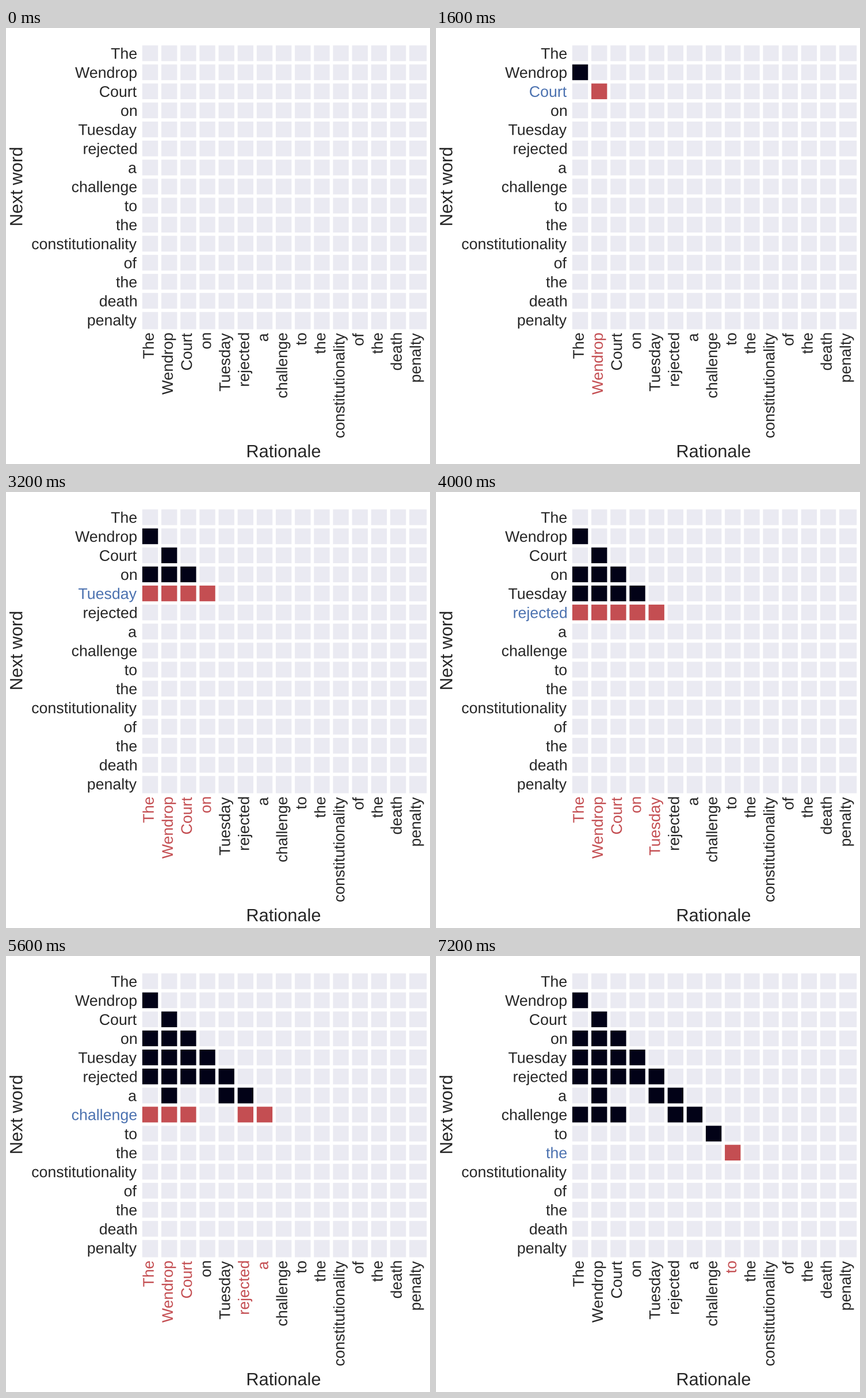
A matplotlib script that plays this animation: 737x759 px, repeating every 8000 ms.

```python
import matplotlib.pyplot as plt
from matplotlib.animation import FuncAnimation
from matplotlib.patches import PathPatch, Rectangle
from matplotlib.textpath import TextPath
from matplotlib.transforms import Affine2D

W, H, DPI = 737, 759, 100
LEFT, TOP, PITCH, GAP = 234.0, 27.4, 33.15, 5.8
RIGHT, BOTTOM = 731.2, 524.4
EMPTY, USED, ACTIVE = "#eaeaf2", "#020217", "#c44e52"
INK, NEXT = "#262626", "#4c72b0"
WORD_PX, TITLE_PX = 26.75, 30.8

WORDS = ("The Wendrop Court on Tuesday rejected a challenge to the "
         "constitutionality of the death penalty").split()
N = len(WORDS)

# Columns that explain each predicted word, by row.
RATIONALES = [[], [0], [1], [0, 1, 2], [0, 1, 2, 3], [0, 1, 2, 3, 4],
              [1, 4, 5], [0, 1, 2, 5, 6], [7], [8]]

plt.rcParams["font.family"] = "Liberation Sans"
fig = plt.figure(figsize=(W / DPI, H / DPI), dpi=DPI, facecolor="white")
ax = fig.add_axes([0, 0, 1, 1])
ax.set_xlim(0, W)
ax.set_ylim(H, 0)
ax.axis("off")


def label(x, y, text, px, center=False, rotation=0):
    """Draw text as outlines, its ink right-aligned or centred on (x, y)."""
    path = TextPath((0, 0), text, size=px)
    box = path.get_extents()
    anchor = (box.x0 + box.x1) / 2 if center else box.x1
    place = (Affine2D().translate(-anchor, 0).scale(1, -1)
             .rotate_deg(-rotation).translate(x, y))
    return ax.add_patch(PathPatch(place.transform_path(path),
                                  facecolor=INK, lw=0))


def make_cell(row, col):
    x = LEFT + col * PITCH + GAP / 2
    y = TOP + row * PITCH + GAP / 2
    # The outer right and bottom edges carry no grid line.
    w = RIGHT - x if col == N - 1 else PITCH - GAP
    h = BOTTOM - y if row == N - 1 else PITCH - GAP
    return ax.add_patch(Rectangle((x, y), w, h, facecolor=EMPTY, lw=0,
                                  snap=False))


cells = [[make_cell(r, c) for c in range(N)] for r in range(N)]
centers = [(i + 0.5) * PITCH for i in range(N)]
row_labels = [label(227, TOP + c + 9.6, word, WORD_PX)
              for c, word in zip(centers, WORDS)]
col_labels = [label(LEFT + c + 6.2, 531.3, word, WORD_PX, rotation=90)
              for c, word in zip(centers, WORDS)]
label(483, 747.2, "Rationale", TITLE_PX, center=True)
label(28.3, 275.8, "Next word", TITLE_PX, center=True, rotation=90)


def update(step):
    active = RATIONALES[step]
    for r, row in enumerate(cells):
        lit = RATIONALES[r] if r <= step else []
        color = ACTIVE if r == step else USED
        for c, cell in enumerate(row):
            cell.set_facecolor(color if c in lit else EMPTY)
    for i in range(N):
        row_labels[i].set_facecolor(NEXT if active and i == step else INK)
        col_labels[i].set_facecolor(ACTIVE if i in active else INK)
    return []


anim = FuncAnimation(fig, update, frames=len(RATIONALES), interval=800,
                     init_func=lambda: update(0), repeat=True)
plt.show()
```
